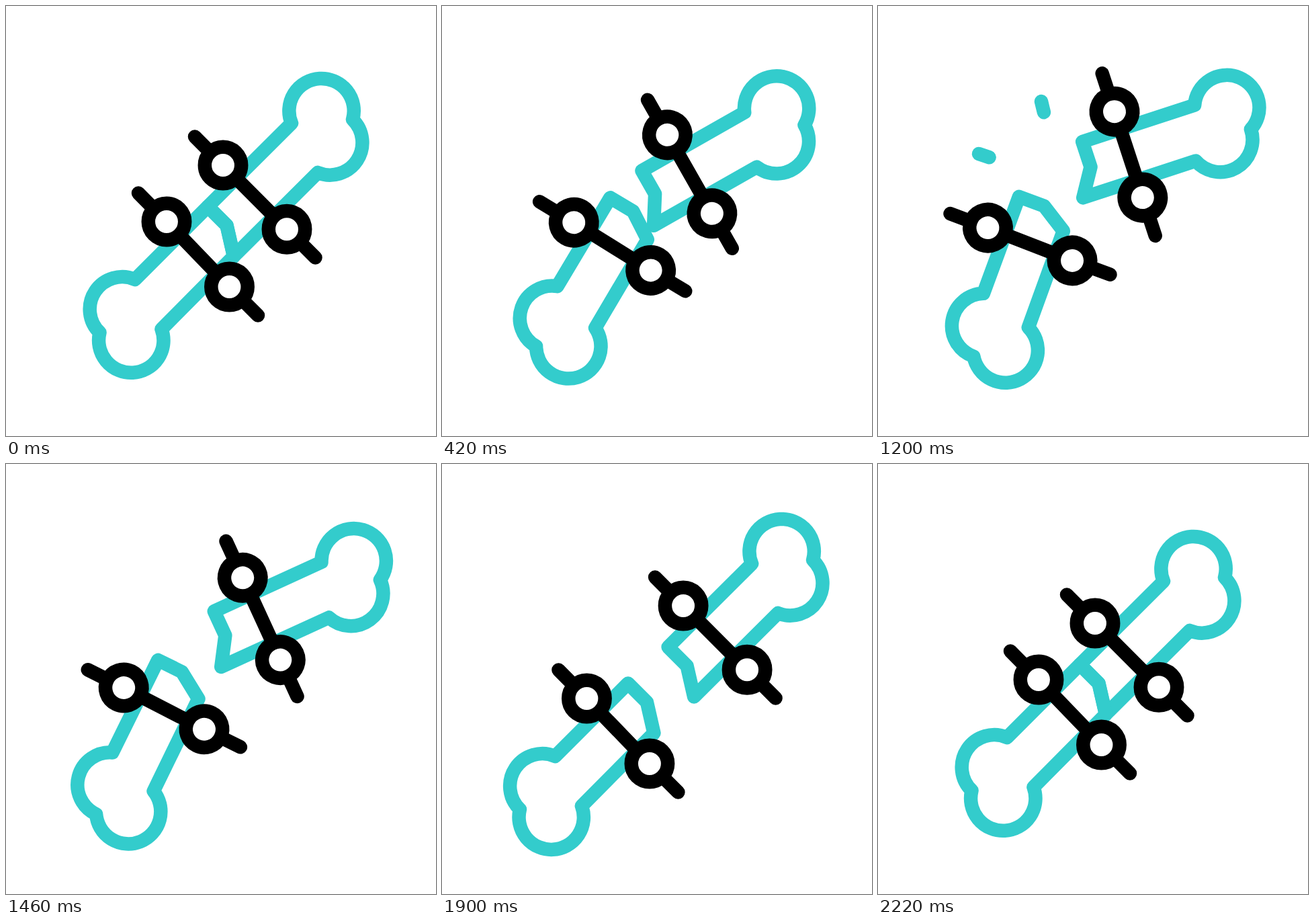
Animation of 640x640 px, one loop 2400 ms. Source, as an HTML page:

```html
<!DOCTYPE html>
<html lang="en">
<head>
<meta charset="utf-8">
<title>Bone fixation</title>
<style>
  html, body { margin: 0; height: 100%; overflow: hidden; background: #fff; }
  svg { display: block; width: 100vw; height: 100vh; }
  path, line, circle { fill: none; stroke-width: 20.5; stroke-linecap: round; stroke-linejoin: round; }
  .bone { stroke: #3cc; }
  .pin { stroke: #000; }
  circle { fill: #fff; }
</style>
</head>
<body>
<svg viewBox="0 0 640 640">
  <line id="dashA" class="bone"/>
  <line id="dashB" class="bone"/>
  <g id="right">
    <path class="bone" d="M300.5 298.5 L425 174.5 A48.2 48.2 0 1 1 516 169 A48.2 48.2 0 0 1 464 248 L339 372.5 L328.5 326.5 Z"/>
    <path class="pin" d="M281 194.5 L460.5 374.5"/>
    <circle class="pin" cx="323" cy="237" r="27.2"/>
    <circle class="pin" cx="418" cy="332.3" r="27.2"/>
  </g>
  <g id="left">
    <path class="bone" d="M339 372.5 L231.5 481 A48.2 48.2 0 1 1 139.5 486 A48.2 48.2 0 0 1 192 407 L300.5 298.5 L328.5 326.5 Z"/>
    <path class="pin" d="M197 278.5 L239 321 L332.5 418 L375 460.5"/>
    <circle class="pin" cx="239" cy="321" r="27.2"/>
    <circle class="pin" cx="332.5" cy="418" r="27.2"/>
  </g>
</svg>
<script>
  const LOOP = 2400;
  const halves = [
    { id: 'right', pivot: [471, 186], angle: 26.8, lift: [36.1, -7.6], shift: [42.7, -30.8] },
    { id: 'left', pivot: [186, 487], angle: -24.8, lift: [-1, 16], shift: [-27.9, 33.2] },
  ];
  const byId = id => document.getElementById(id);

  // Smooth progress from 0 to 1 between two times
  function ease(t, from, to) {
    const x = Math.min(1, Math.max(0, (t - from) / (to - from)));
    return x * x * (3 - 2 * x);
  }

  // Each half turns about its knob while the knob moves in a straight line
  function pose({ id, pivot, angle, lift, shift }, swing, spread) {
    const [x, y] = [0, 1].map(i => lift[i] * swing + shift[i] * spread);
    byId(id).setAttribute('transform', `translate(${x} ${y}) rotate(${angle * swing} ${pivot})`);
  }

  function dash(id, [x, y], [dx, dy], start, end) {
    const line = byId(id);
    const ends = { x1: x + dx * start, y1: y + dy * start, x2: x + dx * end, y2: y + dy * end };
    for (const key in ends) line.setAttribute(key, ends[key]);
    line.style.display = end - start > 0.001 ? '' : 'none';
  }

  function draw(t) {
    const back = ease(t, 1302, 1797);
    const swing = ease(t, 200, 604) - back;
    const spread = back - ease(t, 1797, 2215);
    for (const half of halves) pose(half, swing, spread);

    const end = ease(t, 600, 950), start = ease(t, 950, 1300);
    dash('dashA', [230, 247], [-80, -27], start, end);
    dash('dashB', [263, 225], [-20, -83], start, end);
  }

  const begin = performance.now();
  function tick() {
    draw((performance.now() - begin) % LOOP);
    requestAnimationFrame(tick);
  }
  tick();
</script>
</body>
</html>
```
